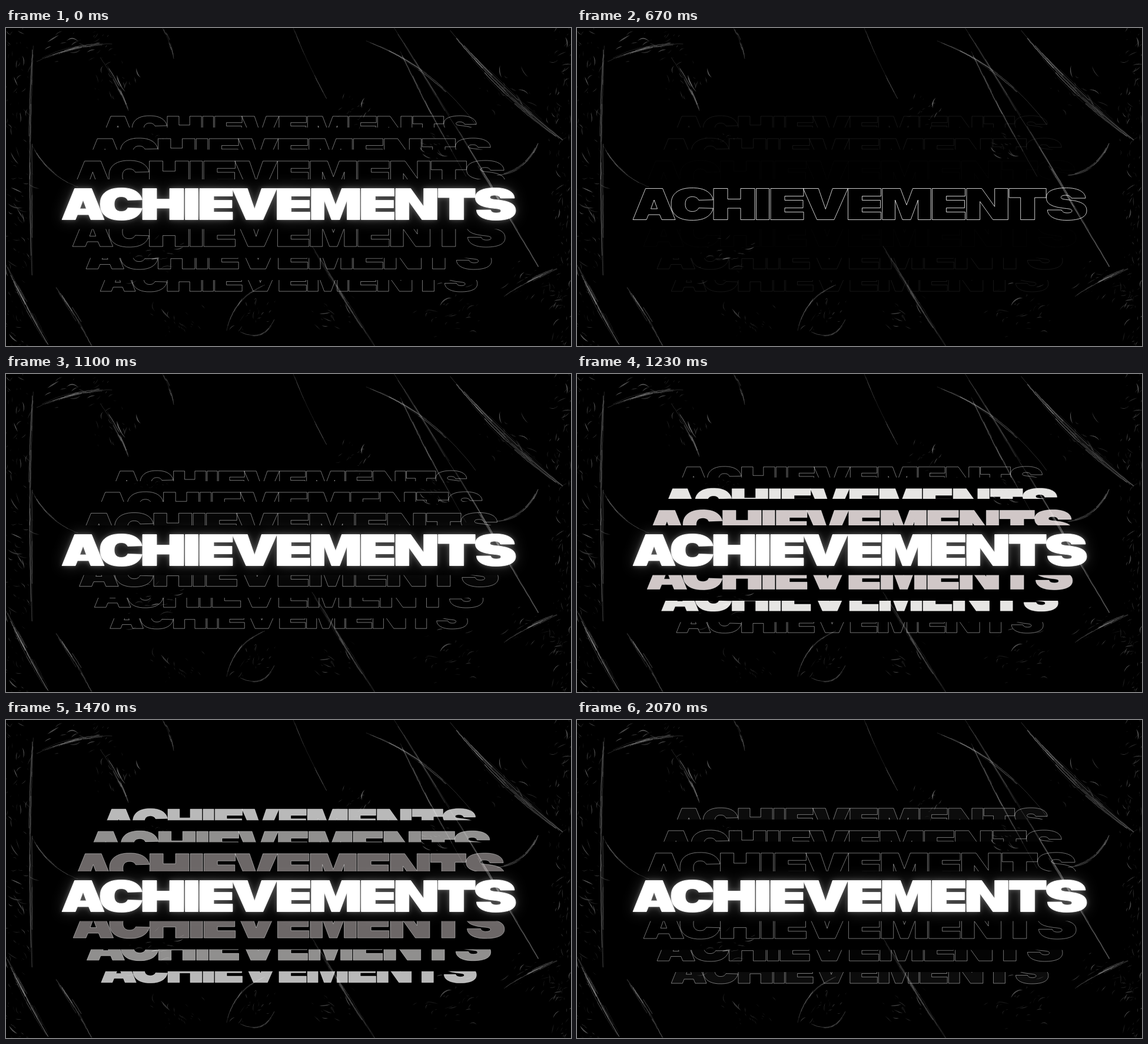
Animation, 960 px wide and 540 px high, one loop 2.17 s. Source, as an HTML page with a canvas:

```html
<!DOCTYPE html>
<html lang="en">
<head>
<meta charset="utf-8">
<title>ACHIEVEMENTS</title>
<style>
  html, body { margin: 0; width: 100%; height: 100%; overflow: hidden; background: #000; }
  canvas, svg { position: absolute; left: 0; top: 0; width: 960px; height: 540px; display: block; }
</style>
</head>
<body>
<canvas id="foil" width="960" height="540"></canvas>
<svg id="stage" viewBox="0 0 960 540" role="img" aria-label="ACHIEVEMENTS">
  <defs>
    <path id="word" vector-effect="non-scaling-stroke"/>
    <filter id="near" x="-10%" y="-60%" width="120%" height="220%"><feGaussianBlur stdDeviation="4"/></filter>
    <filter id="far" x="-10%" y="-120%" width="120%" height="340%"><feGaussianBlur stdDeviation="13"/></filter>
  </defs>
  <g id="rows"></g>
  <g id="glow" fill="#fff">
    <use href="#word" filter="url(#far)" opacity=".22"/>
    <use href="#word" filter="url(#near)" opacity=".3"/>
  </g>
  <use id="main" href="#word" fill="#fff" stroke="#fff" stroke-opacity=".8"/>
</svg>
<script>
const LOOP = 2170;
const $ = id => document.getElementById(id);
const clamp = v => Math.max(0, Math.min(1, v));
const ramp = (t, from, to) => clamp((t - from) / (to - from));

// ---- Crumpled foil, drawn once ----
let seed = 71;
const rnd = () => {
  seed = (seed * 1664525 + 1013904223) >>> 0;
  return seed / 4294967296;
};
const spread = r => (rnd() + rnd() - 1) * r;
const ctx = $('foil').getContext('2d');
const grey = a => `rgba(205,205,205,${a})`;

function crease(x1, y1, x2, y2, bow, width) {
  const len = Math.hypot(x2 - x1, y2 - y1);
  const nx = (y1 - y2) / len, ny = (x2 - x1) / len;
  const alpha = .3 + width * .025;
  const strand = (from, to, shift, thick, a) => {
    ctx.beginPath();
    for (let i = 0; i <= 24; i++) {
      const t = from + (to - from) * i / 24;
      const off = 2 * bow * t * (1 - t) + shift * Math.sin(Math.PI * (.1 + .8 * t));
      ctx.lineTo(x1 + (x2 - x1) * t + nx * off + spread(.5), y1 + (y2 - y1) * t + ny * off + spread(.5));
    }
    ctx.lineWidth = thick;
    ctx.strokeStyle = grey(a);
    ctx.stroke();
  };
  strand(0, 1, 0, .8, alpha * .55);
  for (let i = 0; i < 3 + width * 2; i++) {
    const from = rnd() * .7, to = Math.min(1, from + .12 + rnd() * .4);
    strand(from, to, spread(width), .5 + rnd() * .9, alpha * (.25 + rnd() * .6));
  }
}

function flecks(x, y, rx, ry, count, angle, length) {
  for (let i = 0; i < count; i++) {
    const dir = (angle + spread(55)) * Math.PI / 180;
    const half = length * (.15 + rnd() * rnd()) / 2;
    const px = x + spread(rx), py = y + spread(ry);
    const dx = Math.cos(dir) * half, dy = Math.sin(dir) * half;
    const bend = spread(.9), thick = bend + .12 + rnd() * .3;
    ctx.beginPath();
    ctx.moveTo(px - dx, py - dy);
    ctx.quadraticCurveTo(px - dy * bend, py + dx * bend, px + dx, py + dy);
    ctx.quadraticCurveTo(px - dy * thick, py + dx * thick, px - dx, py - dy);
    ctx.fillStyle = grey(.1 + rnd() * .38);
    ctx.fill();
  }
}

// x1, y1, x2, y2, bow, width
[
  [52, 57, 180, 27, -14, 5], [160, 50, 208, 140, -6, 4], [266, 0, 285, 52, -5, 3],
  [46, 30, 44, 420, 8, 4], [45, 200, 122, 270, 20, 2], [0, 402, 72, 538, 4, 7],
  [85, 440, 146, 540, -5, 4], [488, 0, 545, 120, 4, 1], [440, 436, 375, 514, 27, 3],
  [398, 516, 456, 495, 30, 2], [520, 370, 626, 540, 3, 4], [660, 0, 905, 405, -4, 4],
  [612, 22, 798, 164, -35, 3], [670, 40, 782, 252, 5, 2], [755, 4, 946, 190, 14, 9],
  [904, 195, 834, 250, -27, 4], [846, 456, 936, 408, -5, 4]
].forEach(c => crease(...c));

// Both side edges are densely wrinkled
for (let y = 0; y <= 540; y += 60) {
  flecks(16, y, 34, 60, 14, 70 + spread(60), 26);
  flecks(944, y, 26, 60, 18, 100 + spread(60), 21);
}
// x, y, radius, angle
[
  [130, 30, 70, 155], [190, 90, 50, 75], [250, 390, 60, 172], [292, 500, 46, 55],
  [420, 480, 48, 120], [560, 485, 42, 30], [725, 195, 36, 40], [590, 140, 40, 140],
  [855, 110, 60, 40], [890, 435, 58, 150], [745, 480, 66, 150]
].forEach(([x, y, r, angle]) => flecks(x, y, r, r * .8, r * .5, angle, 23));
flecks(244, 187, 36, 8, 30, 10, 8);

// ---- Wide display lettering, built from its symmetries around y = 299 ----
const CAP = 26.5;
const poly = (cx, pts) => 'M' + pts.map(([x, y]) => `${cx + x} ${299 + y}`).join('L') + 'Z';
const flipX = pts => [...pts, ...pts.map(([x, y]) => [-x, y]).reverse()];
const flipY = pts => [...pts, ...pts.map(([x, y]) => [x, -y]).reverse()];
const spin = pts => [...pts, ...pts.map(([x, y]) => [-x, -y])];

function bowl(rx, ry, from, to) {
  const pts = [];
  for (let i = 0; i <= 40; i++) {
    const a = (from + (to - from) * i / 40) * Math.PI / 180;
    const c = Math.cos(a), s = Math.sin(a);
    pts.push([rx * Math.sign(c) * Math.abs(c) ** .85, ry * Math.sign(s) * Math.abs(s) ** .85]);
  }
  return pts;
}
const letterA = cx =>
  poly(cx, flipX([[-9.5, 18], [-13, CAP], [-36, CAP], [-14.5, -CAP]])) +
  poly(cx, [[-5.5, 8], [5.5, 8], [0, -7]]);
const letterC = cx => poly(cx, [...bowl(36, 27.5, 12, 348), ...bowl(12, 12.5, 332, 28)]);
const letterH = cx => poly(cx, flipX([[-11, 7], [-11, CAP], [-35, CAP], [-35, -CAP], [-11, -CAP], [-11, -8.5]]));
const letterI = cx => poly(cx, flipX([[-11, CAP], [-11, -CAP]]));
const letterE = x => poly(x, flipY([[0, -CAP], [56, -CAP], [56, -13.5], [24, -13.5], [24, -6.5], [55, -6.5]]));
const letterV = cx => poly(cx, flipX([[-14.5, CAP], [-38, -CAP], [-12, -CAP], [0, 8.5]]));
const letterM = cx => poly(cx, flipX([[-7, CAP], [-19.5, -7], [-19.5, CAP], [-41.2, CAP], [-41.2, -CAP], [-10.5, -CAP], [0, 1.5]]));
const letterN = cx => poly(cx, spin([[-35.2, CAP], [-35.2, -CAP], [-9.5, -CAP], [12.5, 4.3], [12.5, -CAP]]));
const letterT = cx => poly(cx, flipX([[-12, CAP], [-12, -11], [-31.5, -11], [-31.5, -CAP]]));
function letterS(cx) {
  const pts = spin([
    [8.3, -10], [7.3, -13], [4.3, -15], [-1.2, -15], [-6.2, -15], [-9.2, -14], [-9.2, -11.5],
    [-9.2, -9], [-6.7, -8.3], [.3, -7.5], [20.3, -5.5], [34.3, -2], [34.3, 11],
    [34.3, 22], [22.3, 27.5], [.3, 27.5], [-21, 27.5], [-32, 20], [-32.3, 10]
  ]).map(([x, y]) => `${cx + x} ${299 + y}`);
  const half = pts.length / 2;
  const lobe = from => `L${pts[from]}C${pts.slice(from + 1, from + half).join(' ')}`;
  return `M${pts[pts.length - 1]}${lobe(0)}${lobe(half)}Z`;
}
$('word').setAttribute('d', letterA(131) + letterC(196) + letterH(267) + letterI(315.5) +
  letterE(329) + letterV(422.3) + letterE(460.5) + letterM(560) + letterE(603.5) +
  letterN(697.2) + letterT(765.7) + letterS(831.7));

// ---- Echo rows above and below ----
const MID_X = 480.5, MID_Y = 298.5, HALF = 27;
const echoes = [
  { dist: 47.3, scale: .9533, travel: 9.7, gap: 0, peak: 1140, fade: [30, 700], tint: '#fff4f4' },
  { dist: 86.9, scale: .8936, travel: 12, gap: 19, peak: 1235, fade: [550, 700], tint: '#fffefc' },
  { dist: 126.6, scale: .831, travel: 13.9, gap: 18.5, peak: 1330, fade: [550, 700], tint: '#fff' }
];
const svgNode = (tag, parent, attrs) => {
  const node = document.createElementNS('http://www.w3.org/2000/svg', tag);
  for (const key in attrs) node.setAttribute(key, attrs[key]);
  return parent.appendChild(node);
};
echoes.forEach((echo, i) => {
  echo.sides = [-1, 1].map(side => {
    const id = `cut${i}${side < 0 ? 'a' : 'b'}`;
    const clip = svgNode('clipPath', $('rows'), { id });
    const rect = svgNode('rect', clip, { x: 0, width: 960 });
    const group = svgNode('g', $('rows'), { 'clip-path': `url(#${id})` });
    const word = svgNode('use', group, { href: '#word', fill: echo.tint, stroke: '#fff', 'stroke-opacity': .45 });
    return { side, rect, word };
  });
});

const flash = (t, peak) => t < peak ? ramp(t, peak - 40, peak) : (1 - ramp(t, peak, peak + 950)) ** 2;

function render(t) {
  const second = t >= 715;
  const fill = second ? 1 - (1 - ramp(t, 730, 1130)) ** 3 : 1 - ramp(t, 30, 650) ** 3;
  $('main').setAttribute('fill-opacity', fill);
  $('glow').setAttribute('opacity', Math.min(1, fill * 1.15));

  // 1 at 1100 ms, easing out to rest at 1780 ms
  const pull = second ? ((1780 - Math.min(1780, Math.max(730, t))) / 680) ** 3 : 0;
  let edge = 0;
  echoes.forEach((echo, i) => {
    const back = echo.travel * pull;
    const dist = echo.dist - back, scale = echo.scale - back * .0031;
    const alpha = second ? ramp(t, 730, 1000) : 1 - ramp(t, ...echo.fade);
    for (const { side, rect, word } of echo.sides) {
      const inner = i ? edge + echo.gap : side < 0 ? 41.5 : 43;
      rect.setAttribute('y', side < 0 ? 0 : MID_Y + inner);
      rect.setAttribute('height', side < 0 ? MID_Y - inner : 540 - MID_Y - inner);
      word.setAttribute('transform',
        `translate(${MID_X} ${MID_Y + side * dist}) scale(${scale}) translate(${-MID_X} -299)`);
      word.setAttribute('opacity', alpha);
      word.setAttribute('fill-opacity', flash(t, echo.peak));
    }
    edge = Math.max(24, dist + HALF * scale);
  });
}

const start = performance.now();
function tick() {
  render((performance.now() - start) % LOOP);
  requestAnimationFrame(tick);
}
render(0);
requestAnimationFrame(tick);
</script>
</body>
</html>
```
